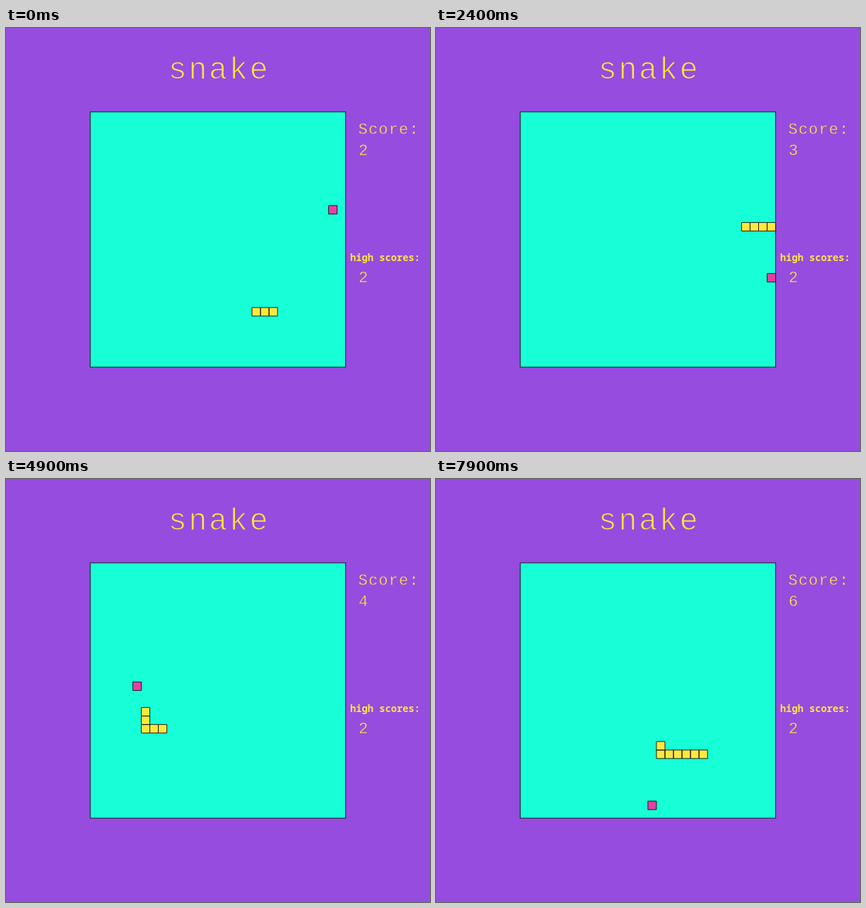
These frames come from a looping animation (600 by 599 pixels, 8000 ms). An HTML page:

```html
<!DOCTYPE html>
<html lang="en">
<head>
<meta charset="utf-8">
<title>snake</title>
<style>
  html, body { margin: 0; width: 100%; height: 100%; overflow: hidden; background: #964cde; }
  svg { display: block; }
  text {
    font: 22px "Courier New", "Liberation Mono", monospace;
    letter-spacing: .054em;
    fill: #ffe53f;
    stroke: #964cde;
    stroke-width: .4;
  }
  .title { font-size: 44px; stroke-width: 1.2; }
  .label { font: 600 13.75px "Noto Sans Mono", monospace; letter-spacing: 0; stroke: none; }
  rect, path { stroke: #1c1c1c; stroke-width: 1; }
  .board { fill: #17ffd6; }
  #snake { fill: #ffe83c; }
  #food { fill: #e63fa3; }
</style>
</head>
<body>
<svg width="600" height="599" viewBox="0 0 600 599">
  <text class="title" x="229.5" y="72">snake</text>
  <text x="498.5" y="150">Score:</text>
  <text id="score" x="499" y="180">2</text>
  <text class="label" x="487" y="330">high scores:</text>
  <text x="499" y="360">2</text>
  <rect class="board" x="119.2" y="118.8" width="361.4" height="361.4"/>
  <path id="food"/>
  <path id="snake"/>
</svg>
<script>
  const LOOP = 8000, FRAME = 100, STEP = 80;
  const LEFT = 119.2, TOP = 118.8, SIZE = 361.4 / 30;
  const START_SCORE = 2;
  const ROUTE = "R9 U13 L3 D3 R4 D6 L23 U3 L1 U7 R2 D11 R5 D1 R4 D1 R5";
  const FOODS = [[28, 11], [29, 19], [5, 14], [17, 22], [15, 28]];
  const DIRS = { R: [1, 0], L: [-1, 0], U: [0, -1], D: [0, 1] };

  const trail = [[19, 23]];
  for (const leg of ROUTE.split(" ")) {
    const [dx, dy] = DIRS[leg[0]];
    for (let n = +leg.slice(1); n > 0; n--) {
      const [x, y] = trail[trail.length - 1];
      trail.push([x + dx, y + dy]);
    }
  }

  // Trail index at which each food is eaten
  const eaten = FOODS.map(([fx, fy]) => {
    const i = trail.findIndex(([x, y]) => x === fx && y === fy);
    return i < 0 ? Infinity : i;
  });

  const cell = ([x, y]) =>
    `M${LEFT + x * SIZE} ${TOP + y * SIZE}h${SIZE}v${SIZE}h${-SIZE}Z`;
  const byId = id => document.getElementById(id);
  const snake = byId("snake"), food = byId("food"), score = byId("score");
  let shown = -1;

  function draw(ms) {
    const frame = Math.floor(ms % LOOP / FRAME);
    if (frame !== shown) {
      shown = frame;
      const head = Math.floor(frame * FRAME / STEP + .35) + 2;
      const meals = eaten.filter(i => i <= head).length;
      const length = START_SCORE + meals + 1;
      snake.setAttribute("d", trail.slice(head - length + 1, head + 1).map(cell).join(""));
      food.setAttribute("d", cell(FOODS[meals]));
      score.textContent = START_SCORE + meals;
    }
    requestAnimationFrame(draw);
  }
  draw(performance.now());
</script>
</body>
</html>
```
